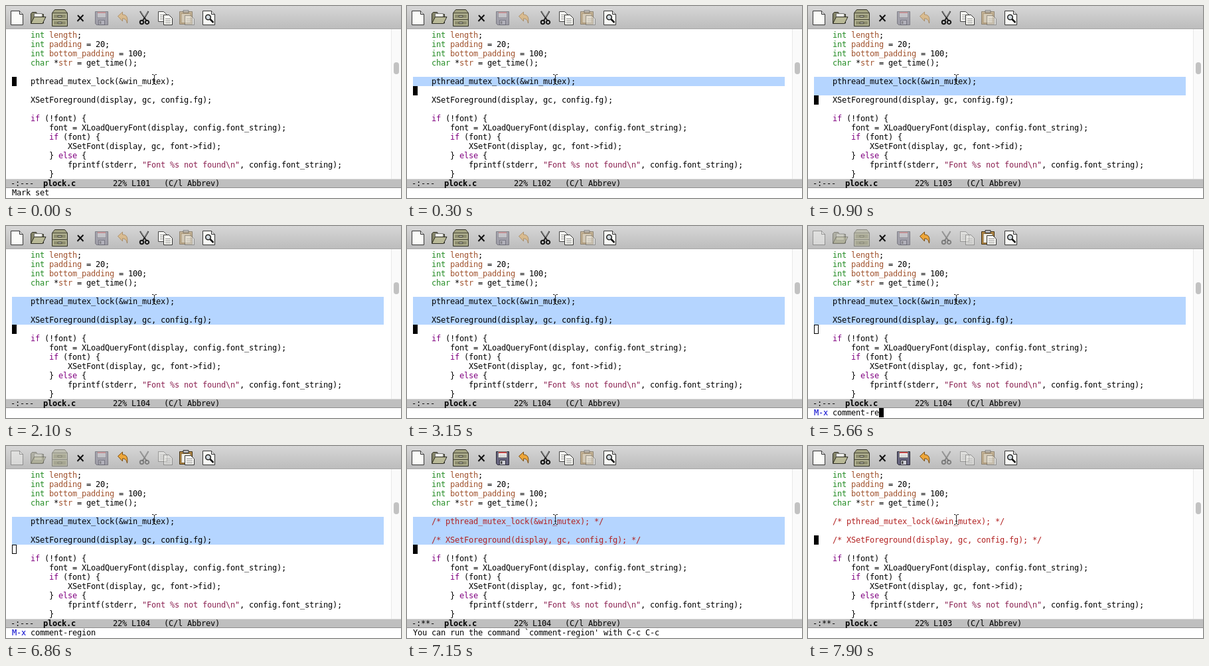
An HTML page with a canvas that plays this animation: 595x290 px, repeating every 8 s.

```html
<!DOCTYPE html>
<html lang="en">
<head>
<meta charset="utf-8">
<title>Commenting a region</title>
<style>
  html, body { margin: 0; width: 100%; height: 100%; overflow: hidden; background: #fff; }
  canvas { display: block; }
</style>
</head>
<body>
<canvas id="stage" width="595" height="290"></canvas>
<script>
const ctx = document.getElementById('stage').getContext('2d');
const LOOP = 8000, CELL = 7, ROW = 14, LEFT = 9, TOP = 37;
const FONT = '12px "DejaVu Sans Mono", monospace';

const code = String.raw`int length;
int padding = 20;
int bottom_padding = 100;
char *str = get_time();

pthread_mutex_lock(&win_mutex);

XSetForeground(display, gc, config.fg);

if (!font) {
    font = XLoadQueryFont(display, config.font_string);
    if (font) {
        XSetFont(display, gc, font->fid);
    } else {
        fprintf(stderr, "Font %s not found\n", config.font_string);
    }`.split('\n');

const syntax = [
  [/\/\*.*\*\//g, '#b22222'],
  [/"[^"]*"/g, '#8b2252'],
  [/\b(int|char)\b/g, '#228b22'],
  [/\b(if|else)\b/g, '#800080'],
  [/(?<=int |char \*)\w+/g, '#a0522d'],
];

// Each step changes part of the state; the rest carries over.
const steps = [
  [0, { row: 5, on: true, marked: true, edited: false, prompt: null, echo: 'Mark set', tools: 'region' }],
  [300, { row: 6, echo: '' }],
  [750, { on: false }],
  [900, { row: 7, on: true }],
  [1200, { row: 8 }],
  [1650, { on: false }],
  [2100, { on: true }],
  [2700, { on: false }],
  [3150, { on: true }],
  [3450, { prompt: '', tools: 'prompt' }],
  ...[3740, 3890, 4030, 4180, 4330, 4470, 4620].map((t, i) => [t, { prompt: 'comment'.slice(0, i + 1) }]),
  [5070, { on: false }],
  [5360, { prompt: 'comment-', on: true }],
  [5660, { prompt: 'comment-re' }],
  [5960, { prompt: 'comment-reg' }],
  [6110, { prompt: 'comment-regio' }],
  [6260, { prompt: 'comment-region' }],
  [6860, { on: false }],
  [7000, { prompt: null, on: true, edited: true, tools: 'edited' }],
  [7150, { echo: "You can run the command `comment-region' with C-c C-c" }],
  [7750, { marked: false, echo: '', tools: 'plain' }],
  [7900, { row: 7 }],
];

const dimmed = {
  region: ['save', 'undo', 'paste'],
  prompt: ['file', 'open', 'cabinet', 'save', 'cut', 'copy'],
  edited: ['paste'],
  plain: ['cut', 'copy', 'paste'],
};

const page = (x, y, w, h) => `M${x} ${y}h${w - 5}l5 5v${h - 5}h${-w}z`;
const lines = (x, y, w, n) => Array.from({ length: n }, (_, i) => `M${x} ${y + i * 3}h${w}`).join('');
const ring = (x, y, r) => `M${x - r} ${y}a${r} ${r} 0 1 0 ${2 * r} 0a${r} ${r} 0 1 0 ${-2 * r} 0`;

// Icon layers: path, fill, stroke, line width.
const icons = {
  file: [
    [page(7.5, 7.5, 18, 21), '#fbfbf8', '#333'],
    ['M20.5 7.5v5h5', '#ddd', '#333'],
  ],
  open: [
    ['M37.5 26V11.5l2-2h6l2 3h9V26z', '#85856a', '#2e2e24'],
    ['M42.5 11.5h12v10h-12z', '#f4f4ee', '#777'],
    ['M37.5 26.5l5-10h17.5l-5 10z', '#b9b997', '#2e2e24'],
  ],
  cabinet: [
    ['M69.5 10.5l4-5h15l4 5v20h-23z', '#a3a382', '#34342a'],
    ['M70 10.5h22M70 20.5h22', null, '#4b4b3b'],
    ['M71.5 12.5h19v6h-19zM71.5 22.5h19v6h-19z', '#8d8d6e', '#bcbc9e'],
    ['M78 14.5h6v2h-6zM78 24.5h6v2h-6z', '#e7e7d8', '#44443a'],
  ],
  close: [['M108 14l8.500 9M116.500 13.500l-9 9.500', null, '#111', 2]],
  save: [
    ['M134.500 8.500h19v20h-17l-2-2z', '#66647e', '#2b2a38'],
    ['M137.500 8.500h13v9h-13z', '#fafafa', '#777'],
    ['M138 10h12', null, '#c44848', 2],
    ['M139 13.500h10M139 15.500h10', null, '#bbb'],
    ['M139.500 21.500h9v7h-9z', '#cfcfd6', '#33323f'],
    ['M141 23h2.500v4h-2.500z', '#444'],
  ],
  undo: [['M168.500 15.500l7-6.500v4c6 0 8.500 4 7 13c-1-5-3-7-7-7v4z', '#eda63a', '#7a4d12']],
  cut: [
    ['M202 8l9.500 14M214.500 8l-8.500 14', null, '#222', 2],
    ['M202.500 8.500l6 8M214 8.500l-5 8', null, '#ddd', .7],
    [ring(204.500, 24.500, 2.700) + ring(212.500, 24.500, 2.700), null, '#161616', 2],
  ],
  copy: [
    [page(229.5, 8.5, 13, 15), '#f8f8f3', '#444'],
    [lines(232, 13.5, 8, 3), null, '#999'],
    [page(237.5, 13.5, 13, 15), '#f8f8f3', '#333'],
    [lines(240, 19.5, 8, 3), null, '#888'],
  ],
  paste: [
    ['M261.500 8.500h19v19h-19z', '#b58a45', '#3f3015'],
    ['M267 6.500h8v4h-8z', '#b9b9b9', '#333'],
    ['M264 11.500h14v14h-14z', '#eeeee6', '#86683a'],
    [page(269.5, 14.5, 14, 14), '#fafaf5', '#333'],
    [lines(272, 19.5, 9, 3), null, '#888'],
  ],
  search: [
    [page(296.5, 7.5, 18, 21), '#fafaf6', '#333'],
    ['M309.500 7.500v5h5', '#ddd', '#333'],
    [ring(304.500, 17, 3.800), '#d5dde2', '#222', 1.500],
    ['M307.500 20l5 5', null, '#111', 2.500],
  ],
};
for (const layers of Object.values(icons))
  for (const layer of layers) layer[0] = new Path2D(layer[0]);

function box(x, y, w, h, color) {
  ctx.fillStyle = color;
  ctx.fillRect(x, y, w, h);
}

// Characters sit on a fixed terminal grid; y is the top of the row.
function type(str, x, y, color = '#000', weight = '') {
  ctx.font = weight + FONT;
  ctx.fillStyle = color;
  [...str].forEach((ch, i) => {
    if (ch !== ' ') ctx.fillText(ch, x + i * CELL, y + 11);
  });
}

function typeCode(str, x, y) {
  const colors = Array(str.length).fill('#000');
  for (const [pattern, color] of syntax)
    for (const m of str.matchAll(pattern)) colors.fill(color, m.index, m.index + m[0].length);
  colors.forEach((color, i) => type(str[i], x + i * CELL, y, color));
}

function drawToolbar(tools) {
  const shade = ctx.createLinearGradient(0, 0, 0, 35);
  shade.addColorStop(0, '#d6d6d6');
  shade.addColorStop(1, '#bcbcbc');
  box(0, 0, 595, 35, shade);
  box(0, 34, 595, 1, '#a6a6a6');
  for (const [name, layers] of Object.entries(icons)) {
    ctx.globalAlpha = dimmed[tools].includes(name) ? 0.4 : 1;
    for (const [path, fill, stroke, width = 1] of layers) {
      if (fill) { ctx.fillStyle = fill; ctx.fill(path); }
      if (stroke) { ctx.strokeStyle = stroke; ctx.lineWidth = width; ctx.stroke(path); }
    }
  }
  ctx.globalAlpha = 1;
}

function drawScrollbar() {
  box(580, 35, 15, 226, '#fafafa');
  box(580, 35, 1, 226, '#e8e8e8');
  ctx.fillStyle = '#c2c2c2';
  ctx.beginPath();
  ctx.roundRect(584, 85, 8, 18, 4);
  ctx.fill();
}

function drawBuffer(s) {
  const y = TOP + s.row * ROW;
  if (s.marked) box(LEFT, TOP + 5 * ROW, 560, (s.row - 5) * ROW, '#b5d5ff');
  code.forEach((str, i) => {
    const comment = s.edited && (i === 5 || i === 7);
    typeCode(comment ? `/* ${str} */` : str, LEFT + 4 * CELL, TOP + i * ROW);
  });
  if (s.prompt !== null) {
    ctx.strokeStyle = '#000';
    ctx.lineWidth = 1;
    ctx.strokeRect(LEFT + .5, y + .5, CELL - 1, ROW - 1);
  } else if (s.on) box(LEFT, y, CELL, ROW, '#000');
}

function drawModeLine(s) {
  box(0, 261, 595, 14, '#bfbfbf');
  box(0, 261, 595, 1, '#d9d9d9');
  box(0, 274, 595, 1, '#8c8c8c');
  const put = (col, str, weight) => type(str, 7 + col * CELL, 261, '#000', weight);
  put(0, s.edited ? '-:**-' : '-:---');
  put(7, 'plock.c', 'bold ');
  put(22, `22% L${96 + s.row}   (C/l Abbrev)`);
}

function drawEcho(s) {
  if (s.prompt === null) return type(s.echo, LEFT, 275);
  type('M-x', LEFT, 275, '#0000cd');
  type(s.prompt, LEFT + 4 * CELL, 275);
  if (s.on) box(LEFT + (4 + s.prompt.length) * CELL, 275, CELL, ROW, '#000');
}

function drawPointer() {
  ctx.strokeStyle = '#222';
  ctx.lineWidth = 1;
  ctx.stroke(new Path2D('M220 103.500h2l1.500 1.500l1.500-1.500h2M223.500 105v12M220 118.500h2l1.500-1.500l1.500 1.500h2M222 113.500h3'));
}

function draw(t) {
  const s = Object.assign({}, ...steps.filter(([at]) => at <= t).map(([, change]) => change));
  box(0, 0, 595, 290, '#fff');
  drawToolbar(s.tools);
  drawScrollbar();
  drawBuffer(s);
  drawModeLine(s);
  drawEcho(s);
  drawPointer();
}

const start = performance.now();
function tick() {
  draw((performance.now() - start) % LOOP);
  requestAnimationFrame(tick);
}
tick();
</script>
</body>
</html>
```
